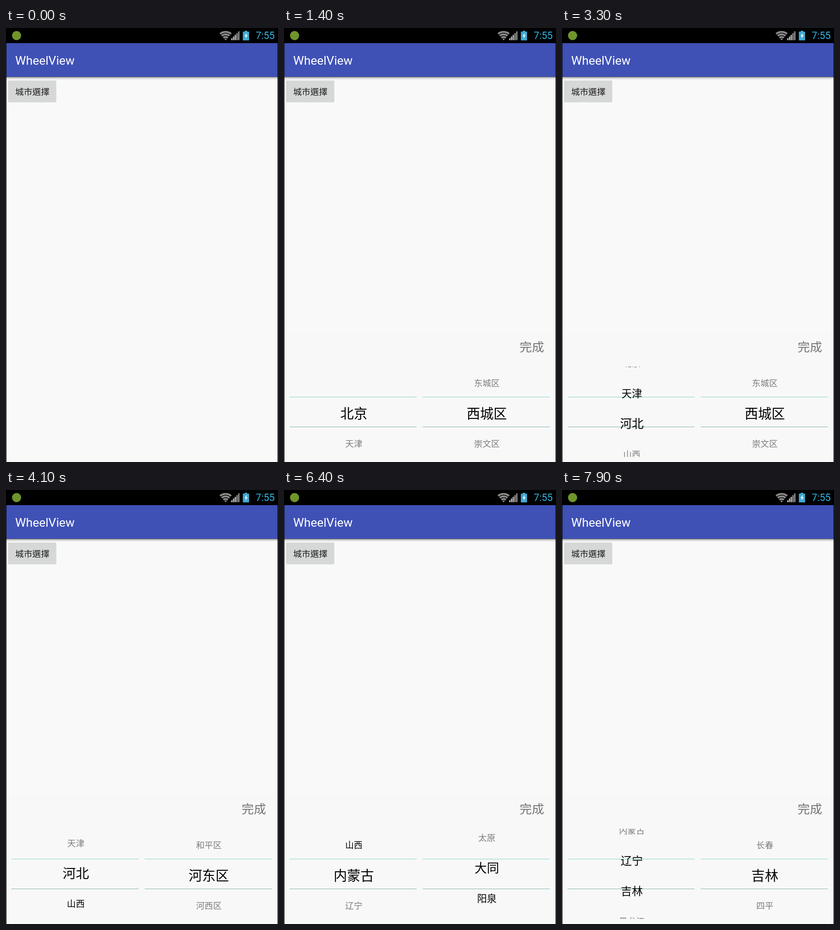
An HTML page that plays this animation: 592x946 px, repeating every 8 s.

```html
<!DOCTYPE html>
<html lang="zh-CN">
<head>
<meta charset="utf-8">
<title>WheelView</title>
<style>
  html, body { margin: 0; width: 100%; height: 100%; overflow: hidden; background: #000; }
  svg { display: block; width: 592px; height: 946px; }
  text { font-family: "Noto Sans CJK SC", "Noto Sans CJK", sans-serif; }
  .latin { font-family: Roboto, sans-serif; }
  .mid { text-anchor: middle; }
</style>
</head>
<body>
<svg viewBox="0 0 592 946" xmlns="http://www.w3.org/2000/svg">
  <defs>
    <linearGradient id="shade" x1="0" y1="0" x2="0" y2="1">
      <stop offset="0" stop-color="#000" stop-opacity=".5"/>
      <stop offset=".4" stop-color="#000" stop-opacity=".17"/>
      <stop offset="1" stop-color="#000" stop-opacity="0"/>
    </linearGradient>
    <clipPath id="window"><rect x="0" y="738" width="592" height="197"/></clipPath>
    <clipPath id="fan"><path d="M478 27L464.5 11Q478 1 491.5 11Z"/></clipPath>
  </defs>

  <rect width="592" height="946" fill="#000"/>
  <rect x="1" y="33" width="590" height="913" fill="#f9f9f9"/>

  <!-- status bar -->
  <circle cx="23" cy="16.5" r="10" fill="#6f952b"/>
  <g clip-path="url(#fan)" fill="none" stroke="#8c8c8c" stroke-width="4">
    <circle cx="478" cy="27" r="18.6"/>
    <circle cx="478" cy="27" r="13"/>
    <circle cx="478" cy="27" r="7.6"/>
    <circle cx="478" cy="27" r="2"/>
  </g>
  <g id="signal"></g>
  <path d="M519.5 6h5.500v2h4v19h-13.500v-19h4z" fill="#3fa9d2"/>
  <path d="M524.500 10.500l-5.500 7h3.200l-1.700 6 5.500-7.500h-3.200z" fill="#fff"/>
  <text class="latin" x="543.500" y="24" font-size="21.330" fill="#33b5e5">7:55</text>

  <!-- app bar -->
  <rect x="1" y="33" width="590" height="73.500" fill="#3f51b5"/>
  <rect x="1" y="106" width="590" height="7" fill="url(#shade)"/>
  <text class="latin" x="20" y="80" font-size="26.400" fill="#fff">WheelView</text>

  <rect id="button" x="4.500" y="114.500" width="105" height="47.500" rx="2.500"/>
  <text class="mid" lang="zh-TW" x="57.300" y="146" font-size="18.670" fill="#1c1c1c"
        style="font-family:'Noto Sans CJK TC','Noto Sans CJK',sans-serif">城市選擇</text>

  <!-- picker sheet -->
  <g id="sheet">
    <rect x="1" y="664" width="590" height="282" fill="#f8f8f8"/>
    <text class="mid" x="539.500" y="705.200" font-size="26.670" fill="#757575">完成</text>
    <path d="M12 804.500H288.500M302 804.500H578.500" stroke="#86d3c7"/>
    <path d="M12 869.500H288.500M302 869.500H578.500" stroke="#7eb0aa"/>
    <g id="wheels" clip-path="url(#window)"></g>
  </g>
</svg>
<script>
const NS = 'http://www.w3.org/2000/svg';
const LOOP = 8000, STEP = 100, PITCH = 66, CENTER = 839.6;
const SMALL = 18.67, LARGE = 29.33;
const byId = id => document.getElementById(id);

const provinces = ['北京', '天津', '河北', '山西', '内蒙古', '辽宁', '吉林', '黑龙江'];

// [time, value] pairs; a value holds until the next time
const districts = [
  [0, ['东城区', '西城区', '崇文区']],
  [3500, ['和平区', '河东区', '河西区']],
  [4600, ['石家庄', '唐山', '秦皇岛']],
  [5700, ['太原', '大同', '阳泉', '长治']],
  [7700, ['长春', '吉林', '四平']]
];

// each run: start time, then one scroll position per step
const leftRuns = [
  [0, 0],
  [2600, 5, 16, 30, 45, 61, 78, 94, 109, 123, 132],
  [4100, 136, 155, 176, 194],
  [4600, 198],
  [5300, 228, 236, 243],
  [5700, 263.4],
  [7400, 272, 298, 321, 339, 352, 362]
];
const rightRuns = [
  [0, 66],
  [6400, 82, 98, 112, 124, 132],
  [7700, 66]
];

const lastBefore = (list, t) => list.filter(e => e[0] <= t).pop();

function scrollAt(runs, t) {
  const run = lastBefore(runs, t);
  const i = Math.round((t - run[0]) / STEP) + 1;
  return run[Math.min(i, run.length - 1)];
}

function add(parent, tag, attrs) {
  const el = document.createElementNS(NS, tag);
  for (const k in attrs) el.setAttribute(k, attrs[k]);
  parent.appendChild(el);
  return el;
}

for (let i = 0; i < 5; i++) {
  const h = 4 + i * 3.8;
  add(byId('signal'), 'rect', {
    x: 490 + i * 3.8, y: 26.5 - h, width: 3, height: h, fill: i < 3 ? '#b4b4b4' : '#8a8a8a'
  });
}

function makeWheel(x) {
  const labels = Array.from({ length: 8 }, () =>
    add(byId('wheels'), 'text', { x, class: 'mid' }));
  return (items, scroll) => labels.forEach((label, i) => {
    const d = i * PITCH - scroll;
    const near = Math.max(0, 1 - Math.abs(d) / PITCH);
    const size = SMALL + (LARGE - SMALL) * near;
    const shown = i < items.length && Math.abs(d) < 2 * PITCH;
    label.textContent = shown ? items[i] : '';
    label.setAttribute('font-size', size);
    label.setAttribute('y', CENTER + d + size * 0.38);
    label.setAttribute('fill', near > 0 ? '#000' : '#7c7c7c');
  });
}

const drawLeft = makeWheel(151.9);
const drawRight = makeWheel(441.4);

function draw(t) {
  t = Math.floor(t / STEP) * STEP;
  byId('button').setAttribute('fill', t === 800 ? '#bfc0c0' : '#d6d7d7');
  byId('sheet').setAttribute('visibility', t < 1300 ? 'hidden' : 'visible');
  byId('sheet').setAttribute('transform', `translate(0 ${t < 1400 ? 110 : 0})`);
  drawLeft(provinces, scrollAt(leftRuns, t));
  drawRight(lastBefore(districts, t)[1], scrollAt(rightRuns, t));
}

const start = performance.now();
function tick() {
  draw((performance.now() - start) % LOOP);
  requestAnimationFrame(tick);
}
tick();
</script>
</body>
</html>
```
